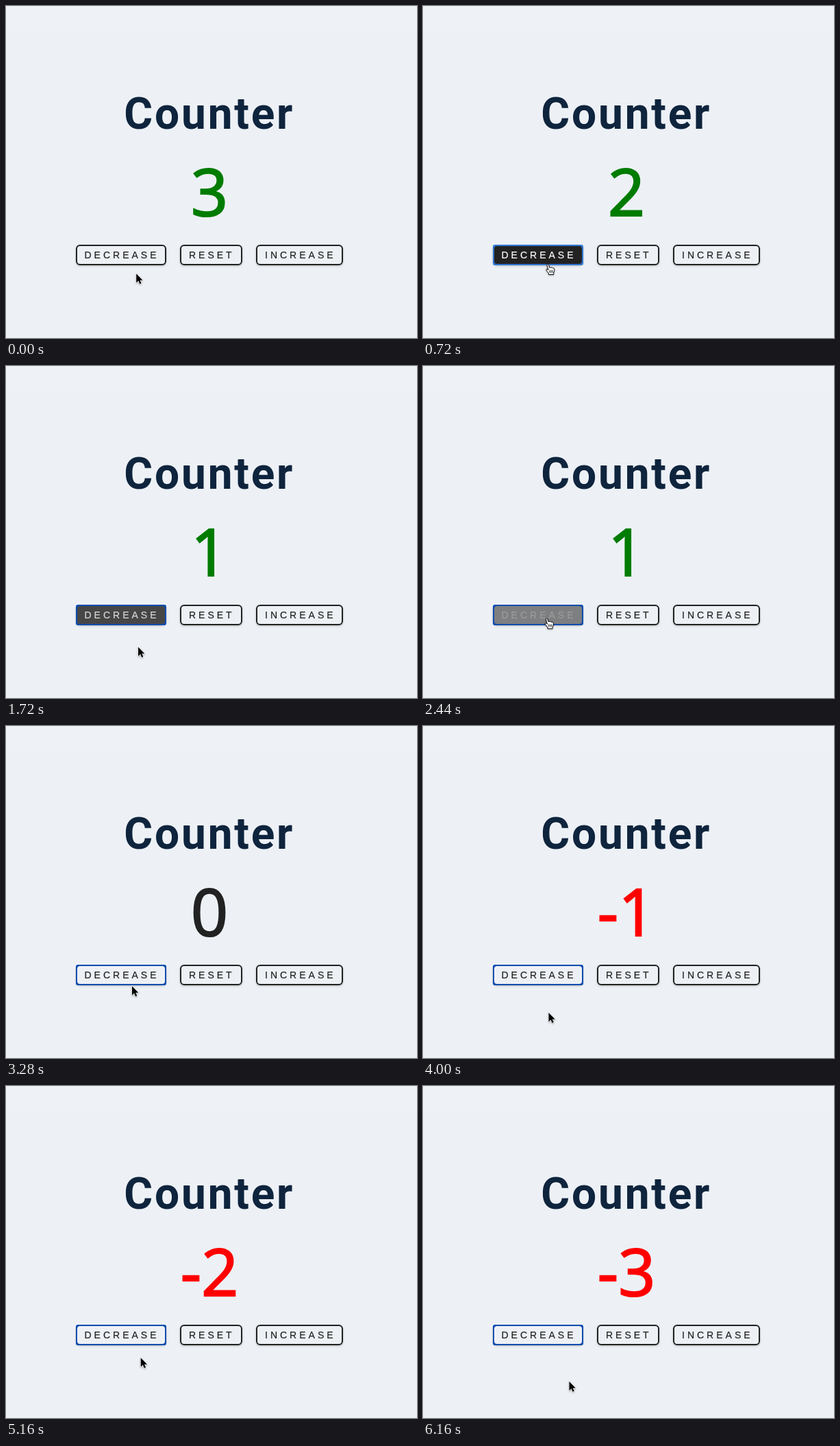
An HTML page for the animation above (6.2 s loop, 600x484 px).

```html
<!DOCTYPE html>
<html lang="en">
<head>
<meta charset="utf-8">
<title>Counter</title>
<style>
  html, body { margin: 0; width: 100%; height: 100%; overflow: hidden; background: #edf1f6; }
  .stage { position: relative; width: 600px; height: 484px; overflow: hidden; }
  .strip { position: absolute; width: 600px; height: 37px; background: #eef2f7; }
  .btn, .ring { position: absolute; top: 348px; height: 30px; box-sizing: border-box; border: 2px solid #222; }
  .btn { border-radius: 6px; box-shadow: 0 1px 3px rgba(0, 0, 0, .25); }
  .dec { left: 102px; width: 132px; }
  .reset { left: 254px; width: 91px; }
  .inc { left: 365px; width: 127px; }
  .ring { border-radius: 3px; }
  svg { position: absolute; left: 0; top: 0; }
  .title { font: 700 64px Roboto, sans-serif; letter-spacing: 2.8px; fill: #0f243d; }
  .value { font: 400 94.5px "Open Sans", sans-serif; text-anchor: middle; stroke-width: 2.2px; }
  .label {
    font: 14px "Liberation Sans", Arial, sans-serif; letter-spacing: 4px;
    fill: #222; stroke: currentColor; stroke-width: .2px; color: #222;
  }
  .cursor { filter: drop-shadow(0 1px 1px rgba(0, 0, 0, .35)); }
</style>
</head>
<body>
<div class="stage">
  <div class="strip"></div>
  <div class="btn dec" id="dec"></div>
  <div class="btn reset"></div>
  <div class="btn inc"></div>
  <div class="ring dec" id="ring"></div>
  <svg width="600" height="484" viewBox="0 0 600 484">
    <text class="title" x="172.3" y="178.5">Counter</text>
    <text class="value" id="value" x="297" y="306">3</text>
    <text class="label" id="decLabel" x="114.5" y="368">DECREASE</text>
    <text class="label" x="267" y="368">RESET</text>
    <text class="label" x="378" y="368">INCREASE</text>
    <g class="cursor" id="cursor">
      <path id="arrow" d="M.5 .8V14.6L3.7 11.6L5.8 16.4L8.1 15.4L6 10.7H10.2Z"
        fill="#000" stroke="#fff" stroke-width="1.2" paint-order="stroke"/>
      <g id="hand" fill="#fff" stroke="#000" stroke-linejoin="round" stroke-linecap="round">
        <path d="M-3.2 1.3C-3.5-.3-1.3-.9-.7.9L.7 5.1C1.5 4.1 2.8 4.4 3.1 5.3
          C4 4.5 5.3 4.9 5.6 5.8C6.8 5.2 8 6 8.1 7.4C8.3 9.8 7.6 11.3 6.9 12.8V15.5H-.5V13.7
          C-1.8 12-3.2 10.7-4.3 8.9C-5 7.5-3.4 6.6-2.3 7.6L-1.4 8.4Z"/>
        <path d="M1 9.3V12.4M3.2 9.3V12.4M5.3 9.3V12.4" fill="none" stroke-width=".9"/>
      </g>
    </g>
  </svg>
</div>
<script>
  const LOOP = 6200, STEP = 40, FADE = 300;
  const RISE = 320, DROP = 120, CLICK_LEAD = 60;
  const TOP = { x: 182.5, y: 368 }, EDGE = 378;

  // When the pointer settles on the button, and when it pulls away again
  const arrive = [160, 1400, 2400, 3380, 4400, 5320];
  const leave = [685, 1615, 2600, 3600, 4640, 5600];
  // Where it rests before the first visit and after each one
  const restX = [197, 190, 193, 187, 183, 210, 213];

  const $ = id => document.getElementById(id);
  const clamp = v => Math.min(1, Math.max(0, v));
  const smooth = v => (v = clamp(v)) * v * (3 - 2 * v);
  const mix = (a, b, k) => `rgb(${a.map((v, i) => Math.round(v + (b[i] - v) * k))})`;
  const dark = [34, 34, 34], light = [237, 241, 246], white = [255, 255, 255];

  function pointer(t) {
    const visits = leave.filter(s => s <= t).length;
    const gone = visits ? smooth((t - leave[visits - 1]) / DROP) : 1;
    const back = visits < arrive.length ? smooth((arrive[visits] - t) / RISE) : 1;
    const depth = Math.min(gone, back);
    const restY = 410 + .8 * (visits - 1) ** 2;
    return {
      x: TOP.x + (restX[visits] - TOP.x) * depth,
      y: TOP.y + (restY - TOP.y) * depth
    };
  }

  const inside = t => pointer(t).y < EDGE;

  // Hover transition, including fades interrupted half way
  function hover(t) {
    let level = 0;
    for (let s = STEP; s <= t; s += STEP) {
      level = clamp(level + (inside(s) ? STEP : -STEP) / FADE);
    }
    return smooth(level);
  }

  function draw(now) {
    const t = Math.floor((now % LOOP) / STEP) * STEP;
    const clicks = leave.filter(s => s - CLICK_LEAD <= t).length;
    const n = 3 - clicks;
    const color = n > 0 ? '#007c00' : n < 0 ? '#ff0000' : '#222222';
    $('value').textContent = n;
    $('value').style.fill = $('value').style.stroke = color;

    const level = hover(t);
    const blue = level > .9 ? '#2f76cf' : '#0b4cae';
    const ink = mix(dark, white, level);
    $('dec').style.background = mix(light, dark, level);
    $('dec').style.borderColor = clicks ? blue : '#222';
    $('decLabel').style.fill = $('decLabel').style.color = ink;
    $('ring').style.borderColor = blue;
    $('ring').style.display = clicks ? 'block' : 'none';

    const { x, y } = pointer(t), over = inside(t);
    $('cursor').setAttribute('transform', `translate(${x} ${y}) scale(.96)`);
    $('arrow').style.display = over ? 'none' : 'inline';
    $('hand').style.display = over ? 'inline' : 'none';
  }

  const start = performance.now();
  function tick() {
    draw(performance.now() - start);
    requestAnimationFrame(tick);
  }
  tick();
</script>
</body>
</html>
```
